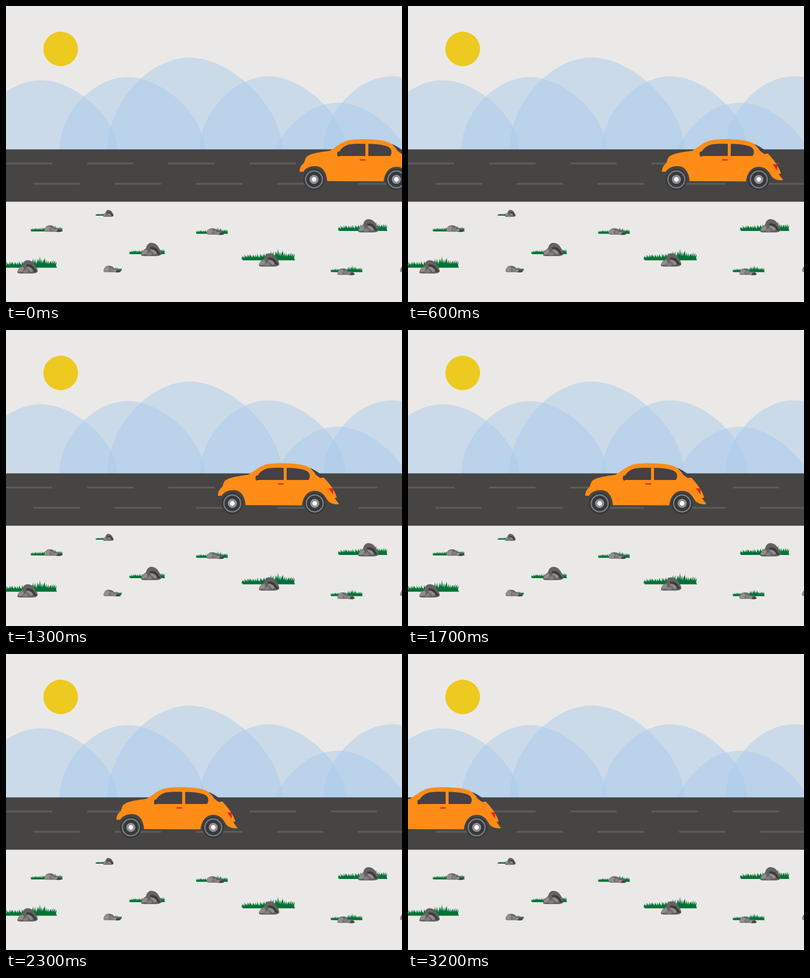
An HTML page for the animation above (3.3 s loop, 800 by 600 pixels).

```html
<!DOCTYPE html>
<html lang="en">
<head>
<meta charset="utf-8">
<title>Car on a road</title>
<style>
  html, body { margin: 0; width: 100%; height: 100%; overflow: hidden; background: #ebe9e7; }
  svg { display: block; width: 800px; height: 600px; }
  .hills { fill: #a7c7ea; fill-opacity: .47; }
  .lane { stroke: #5d5c5a; stroke-width: 3.6; stroke-dasharray: 93.7 70.3; }
  .glass { fill: #454045; }
  .red { fill: #e8251f; }

  /* one jump every 100 ms, slowly gaining speed */
  #car { animation: drive 3.3s infinite; }
  @keyframes drive {
    0%     { transform: translateX(593px); animation-timing-function: steps(6); }
    18.18% { transform: translateX(513px); animation-timing-function: steps(6); }
    36.36% { transform: translateX(438px); animation-timing-function: steps(1); }
    39.39% { transform: translateX(428px); animation-timing-function: steps(4); }
    51.51% { transform: translateX(358px); animation-timing-function: steps(1); }
    54.54% { transform: translateX(333px); animation-timing-function: steps(5); }
    69.69% { transform: translateX(223px); animation-timing-function: steps(1); }
    72.72% { transform: translateX(198px); animation-timing-function: steps(3); }
    81.81% { transform: translateX(113px); animation-timing-function: steps(3); }
    90.90% { transform: translateX(8px); animation-timing-function: steps(2); }
    96.96%, 100% { transform: translateX(-57px); }
  }
</style>
</head>
<body>
<svg viewBox="0 0 800 600">
  <defs>
    <!-- unit hill: peak above the origin, right side a little wider -->
    <path id="hill" d="M-1 0C-1 -.49 -.51 -1 0 -1C.51 -1 1.125 -.46 1.125 0Z"/>
    <path id="grass" fill="#007236"/>
    <g id="boulder">
      <path fill="#656261" d="M0 24C1 18 5 14 10 11C11 5 15 0 20 0C28 0 33 4 37 12C40 16 41 20 41 23C39 27 32 27 25 27H9C4 27 0 27 0 24Z"/>
      <path fill="#3d3b3a" d="M18 9C26 7 33 11 36 19L40 22L35 24L31 20C28 15 24 12 18 12Z"/>
      <path fill="#8f8c8a" d="M1 22C2 17 6 14 11 13L13 17L11 23L3 24ZM19 14C25 13 30 16 32 21L27 24C25 21 22 18 19 17Z"/>
      <path fill="#817e7c" d="M13 20L19 18L23 24L16 26L11 25Z"/>
    </g>
    <g id="pebbles">
      <path fill="#6a6766" d="M0 11C1 5 5 1 10 1C16 1 20 3 22 7C27 6 32 8 33 10L35 13C33 15 27 15 21 14H4C1 14 0 13 0 11Z"/>
      <path fill="#92908e" d="M0 11C1 6 4 3 9 2L13 6L10 9L12 13H4C1 13 0 12 0 11ZM19 13C19 9 23 8 27 9L25 13Z"/>
      <path fill="#83807e" d="M13 6L18 5L21 9L18 13H14L12 9Z"/>
      <path fill="#454342" d="M27 10L33 10L35 13L31 14.5L25 14Z"/>
    </g>
    <g id="wheel">
      <circle r="21.7" fill="#37383c"/>
      <circle r="17" fill="none" stroke="#7c7d81" stroke-width="2.6"/>
      <circle r="9.2" fill="#929295"/>
      <circle r="4.7" fill="#fff"/>
    </g>
  </defs>

  <rect width="800" height="600" fill="#ebe9e7"/>
  <circle cx="110.5" cy="87" r="35" fill="#edca20"/>
  <g class="hills">
    <use href="#hill" transform="translate(70 291) scale(137 140.5)"/>
    <use href="#hill" transform="translate(246 291) scale(138 147)"/>
    <use href="#hill" transform="translate(371 291) scale(166 186.5)"/>
    <use href="#hill" transform="translate(530 291) scale(138.5 148.5)"/>
    <use href="#hill" transform="translate(670 344) scale(137 148)"/>
    <use href="#hill" transform="translate(780 291) scale(138.5 148.5)"/>
  </g>

  <rect y="290.6" width="800" height="106.1" fill="#464543"/>
  <path class="lane" d="M0 319.3H800"/>
  <path class="lane" d="M55.5 360.5H800"/>

  <g>
    <use href="#grass" transform="translate(-8 530.5)"/>
    <use href="#grass" transform="translate(473 515.5)"/>
    <use href="#grass" transform="translate(668 456) scale(.925)"/>
    <use href="#grass" transform="translate(48 457) scale(.6)"/>
    <use href="#grass" transform="translate(382 461.7) scale(.6)"/>
    <use href="#grass" transform="translate(654 539.5) scale(.6)"/>
    <use href="#grass" transform="translate(247 503) scale(.67)"/>
    <use href="#grass" transform="translate(180 425) scale(.33)"/>
    <use href="#grass" transform="translate(196.5 536.5) scale(.34)"/>
    <use href="#boulder" x="23" y="515.3"/>
    <use href="#boulder" x="273" y="480"/>
    <use href="#boulder" x="511" y="501.3"/>
    <use href="#boulder" x="711.5" y="432"/>
    <use href="#boulder" transform="translate(196 413.3) scale(.52)"/>
    <use href="#pebbles" x="77.5" y="443.5"/>
    <use href="#pebbles" x="405.5" y="449.5"/>
    <use href="#pebbles" x="669.5" y="531"/>
    <use href="#pebbles" x="197" y="525.5"/>
    <use href="#pebbles" x="796" y="525"/>
  </g>

  <g id="car">
    <path class="glass" d="M186 279.500C195 283 207 291 215 298L206 301Z"/>
    <path fill="#ff8c17" d="M0 336C0 328 4 322 9 318C11 313 11 309 15 305C25 298 43 296 61 293.500C72 287 82 278 94 273.500C106 270 121 270 134 270C152 270.500 164 271.500 173 274C180 276 184 278 188 281C193 289 200 296 207 300L214 299C222 307 229 316 234 325C237 331 240 336 240 339.500L236 341L245 353C235 354 229 352 223 347C217 339 213 326 195 326C180 326 171 341 170 355.500L56 355C55 340 48 324.500 32 324.500C20 324.500 12 329 7.500 336Z"/>
    <path class="glass" d="M80 304C76 296 88 283 101 280.500C111 279 122 279 133 279.500V304ZM139 279.500C154 279.500 171 281 180 286C186 290 188 297 183 304H139Z"/>
    <ellipse class="glass" cx="79" cy="300" rx="3" ry="5.200"/>
    <path class="red" d="M121.500 310.800H133V313.200H121.500ZM224 321H233V334Z"/>
    <use href="#wheel" x="29.200" y="351.500"/>
    <use href="#wheel" x="195.700" y="351.500"/>
  </g>
</svg>
<script>
  let seed = 7;
  const random = () => (seed = seed * 16807 % 2147483647) / 2147483647;

  // a strip of turf with leaning blades, tallest right of the middle
  let turf = 'M5 0V-4H109L111 0Z';
  for (let x = 5; x < 109; x += 3) {
    const tall = 13 + 10 * Math.exp(-(((x - 78) / 20) ** 2));
    const h = tall * (.6 + .45 * random());
    const tip = x + (x - 55) / 16 + 5 * (random() - .5);
    turf += `M${x - 2.4} -2Q${x - 1.2} ${-h * .6} ${tip} ${-h}Q${x + 2} ${-h * .5} ${x + 2.4} -2Z`;
  }
  document.getElementById('grass').setAttribute('d', turf);
</script>
</body>
</html>
```
